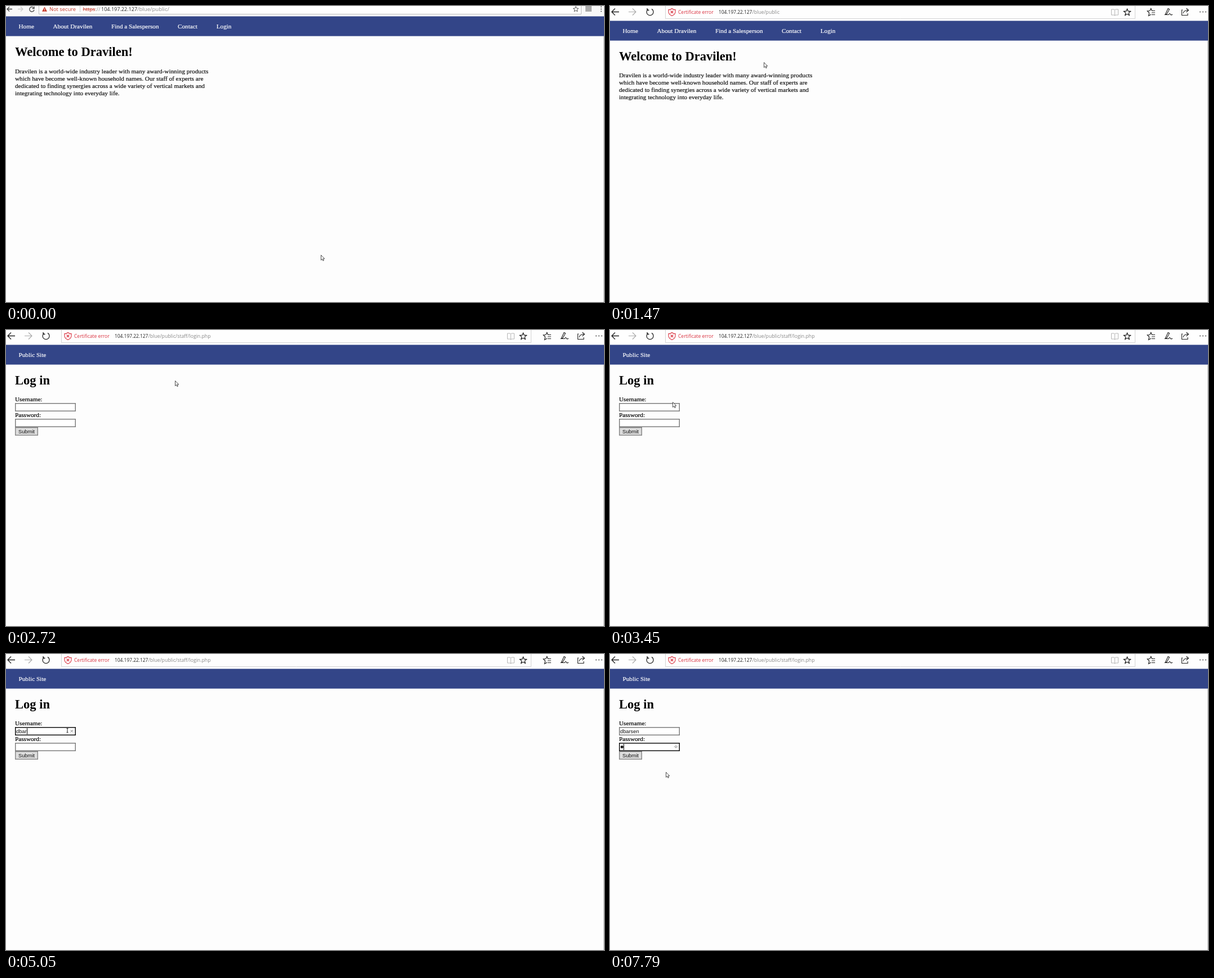
An HTML page with a canvas that plays this animation: 1062 px wide and 527 px high, repeating every 8000 ms.

```html
<!DOCTYPE html>
<html lang="en">
<meta charset="utf-8">
<title>Login demo</title>
<style>
  html, body { margin: 0; width: 100%; height: 100%; overflow: hidden; background: #fdfdfd; }
  canvas { display: block; }
</style>
<canvas id="stage" width="1062" height="527"></canvas>
<script>
const ctx = document.getElementById('stage').getContext('2d');
const LOOP = 8000, NAVY = '#334588', RED = '#d9303e';
const SERIF = '"Liberation Serif", serif';
const SANS = '"Liberation Sans", sans-serif';
const UI = '"Open Sans", sans-serif';

const PARAGRAPH = [
  'Dravilen is a world-wide industry leader with many award-winning products',
  'which have become well-known household names. Our staff of experts are',
  'dedicated to finding synergies across a wide variety of vertical markets and',
  'integrating technology into everyday life.'
];
const USER = 'dbarsen';
const USER_KEYS = [4170, 4740, 4900, 5050, 5320, 5460, 5600];

// Pointer positions: time, x, y, shape
const POINTER = [
  [0, 559, 443], [320, 530, 441], [510, 483, 437],
  [790, 440, 390], [950, 380, 310], [1110, 320, 220], [1270, 280, 150],
  [1430, 273, 100], [1590, 300, 65], [1740, 350, 48], [1890, 360, 47],
  [2030, 372, 46, 'hand'], [2160, 382, 45, 'hand'], [2590, 361, 59],
  [2720, 300, 90], [2855, 220, 130], [2990, 166, 158],
  [3300, 140, 140], [3450, 111, 128], [3600, 109, 132, 'beam'],
  [5990, 102, 147], [6140, 92, 161, 'beam'], [6290, 85, 172],
  [6560, 82, 162, 'beam'], [6850, 90, 185], [6990, 96, 200], [7130, 99, 210]
];

function rect(x, y, w, h, color) {
  ctx.fillStyle = color;
  ctx.fillRect(x, y, w, h);
}
function text(str, x, y, size, color = '#000', family = SERIF, weight = '') {
  ctx.font = `${weight} ${size}px ${family}`;
  ctx.fillStyle = ctx.strokeStyle = color;
  ctx.fillText(str, x, y);
  if (family === SERIF && !weight) {
    ctx.lineWidth = 0.2; // slightly heavier body text
    ctx.strokeText(str, x, y);
  }
  return x + ctx.measureText(str).width;
}
function line(path, color = '#222', width = 1.2, fill) {
  const shape = new Path2D(path);
  if (fill) { ctx.fillStyle = fill; ctx.fill(shape); }
  ctx.strokeStyle = color;
  ctx.lineWidth = width;
  ctx.stroke(shape);
}
function frame(x, y, w, h, color, width) {
  ctx.strokeStyle = color;
  ctx.lineWidth = width;
  ctx.strokeRect(x + width / 2, y + width / 2, w - width, h - width);
}
function star(cx, cy, r, color = '#111', width = 1.2) {
  let path = '';
  for (let i = 0; i < 10; i++) {
    const a = i * Math.PI / 5, d = i % 2 ? r * 0.45 : r;
    path += `${i ? 'L' : 'M'}${cx + d * Math.sin(a)} ${cy - d * Math.cos(a)}`;
  }
  line(path + 'Z', color, width);
}
function dots(x, y, dx, dy) {
  for (let i = -1; i < 2; i++) rect(x + i * dx - 0.8, y + i * dy - 0.8, 1.6, 1.6, '#333');
}

function compactToolbar() {
  rect(0, 0, 1062, 18, '#f8f8f8');
  rect(58, 0, 964, 15, '#fff');
  line('M58.5 0V14.5H1021.5V0', '#bbb', 1);
  line('M11 5.5H2M6 1.5L2 5.5L6 9.5', '#444', 1.3);
  line('M21 5.5H30M26 1.5L30 5.5L26 9.5', '#ccc', 1.3);
  line('M49 3A4.2 4.2 0 1 0 50 7M50 1V4.5H46.5', '#444', 1.3);
  line('M68.5 2L72.5 9.5H64.5Z', '#c53929', 0.6, '#c53929');
  rect(68, 4.5, 1, 2.4, '#fff');
  rect(68, 7.6, 1, 1, '#fff');
  text('Not secure', 77, 9, 9.3, '#c53929', UI);
  rect(131, 0, 1, 11, '#ccc');
  const end = text('https', 136.5, 9, 9.1, '#c53929', UI);
  rect(136.5, 5.6, end - 136.5, 0.8, '#c53929');
  text('://', end, 9, 9.1, '#888', UI);
  text('104.197.22.127', 169, 9, 9.05, '#222', UI);
  text('/blue/public/', 233, 9, 9.55, '#888', UI);
  star(1012, 5.8, 5, '#555', 1);
  rect(1029, 0, 11, 10, '#aaa');
  dots(1057, 5.5, 0, 4);
}

function wideToolbar(loading, path) {
  rect(0, 0, 1062, 26, '#fefefe');
  if (loading) {
    for (const [x, w] of [[78, 19], [934, 20], [970, 14], [1000, 29]]) rect(x, 3, w, 14, '#f1f1f1');
  }
  line('M98.5 0V22.5H932.5V0', '#d4d4d4', 1);
  line('M16 10.5H3M9 4.5L3 10.5L9 16.5', '#222', 1.3);
  line('M33 10.5H46M40 4.5L46 10.5L40 16.5', '#aaa', 1.2);
  if (loading) line('M66 5.5L76 15.5M76 5.5L66 15.5');
  else line('M67.5 5.8A6 6 0 1 0 74 5.4M66 4V7.5H69.5', '#222', 1.3);
  line('M110 4.5Q113 7 116 6.5V11Q115.5 15 110 17.5Q104.5 15 104 11V6.5Q107 7 110 4.5Z', RED, 1.1);
  line('M107.7 8.5L112.3 13M112.3 8.5L107.7 13', RED, 1.1);
  text('Certificate error', 121, 14, 8.5, RED, UI);
  text('104.197.22.127', 193, 14.3, 8.4, '#222', UI);
  text(path, 252.5, 14.3, 8.7, '#888', UI);
  line('M896.5 7V17M890.5 6H895L896.5 7L898 6H902.5V16H898L896.5 17L895 16H890.5Z', '#b5b5b5', 1);
  star(918.5, 11.5, 6.3);
  line('M961 15L956.5 17.3L957.6 12.3L954.3 9L958.7 8.5L960.7 4.5L962.5 8.5H968M962 12H968M962 15.5H968', '#222', 1.2);
  line('M986 15.5L991 4.5L993.5 5.8L989 14L986 15.5H992Q994 12 995 14.5T999 15', '#222', 1.1);
  line('M1017 7H1015.5V16.5H1026V13M1018 13Q1019 7.5 1027 7.5M1023.5 4L1027.5 7.5L1023.5 11', loading ? '#aaa' : '#222', 1.1);
  dots(1053, 10.5, 5, 0);
}

function page(top, links, title) {
  rect(0, top + 0.4, 1062, 35.2, NAVY);
  rect(1061, top + 36, 1, 491, '#c4c4c4');
  for (const [label, x] of links) text(label, x, top + 22.3, 11.2, '#fff');
  text(title, 16, top + 71, 22.5, '#000', SERIF, 'bold');
}

function homePage(top) {
  page(top, [['Home', 22.5], ['About Dravilen', 83.5], ['Find a Salesperson', 187],
    ['Contact', 305], ['Login', 373.7]], 'Welcome to Dravilen!');
  PARAGRAPH.forEach((row, i) => text(row, 16, top + (top < 20 ? 102 : 101.3) + i * 12.9, 11.2, '#111'));
}

function field(y, value, focused, hovered, caret) {
  rect(16, y, 108, 15, '#fff');
  frame(16, y, 108, 15, focused ? '#111' : hovered ? '#3ca5d4' : '#7d7d7d', 1.5);
  const end = text(value, 18, y + 10.8, 9.3, '#111', SANS);
  if (caret) rect(Math.round(end), y + 2, 1, 11, '#000');
}

function loginPage(t) {
  page(26, [['Public Site', 22.5]], 'Log in');
  text('Username:', 16, 127.3, 11.2);
  text('Password:', 16, 155.3, 11.2);
  const typed = USER.slice(0, USER_KEYS.filter(k => t >= k).length);
  const onUser = t >= 3760 && t < 6700, onPassword = t >= 6700;
  field(130, typed, onUser, t >= 3600 && t < 3760, onUser && t < 5990);
  if (onUser && typed) line('M114.5 135L119 139.5M119 135L114.5 139.5', '#777', 0.9);

  const dot = t >= 7550;
  field(158, '', onPassword, t >= 6140 && t < 6700, onPassword && !dot);
  if (dot) {
    line('M23.3 165.5A2 2 0 1 1 19.3 165.5A2 2 0 1 1 23.3 165.5', '#111', 1, '#111');
    rect(24, 160, 1, 11, '#000');
    line('M114 165.5Q117 161.5 120 165.5M116 165.3A1.1 1.1 0 1 0 118 165.3', '#777', 0.9);
  }
  rect(16, 173, 41, 15, '#ddd');
  frame(16, 173, 41, 15, '#858585', 1.4);
  text('Submit', 22, 183.8, 9.3, '#111', SANS);
}

function pointer(t) {
  const [, x, y, shape] = POINTER.findLast(p => t >= p[0]);
  ctx.save();
  ctx.translate(x, y);
  if (shape === 'beam') line('M-1.5 .5H1.5M0 .5V7.5M-1.5 7.5H1.5', '#222', 1);
  else if (shape === 'hand') line('M2 7V1Q3 0 4 1V5L7 6V10L6 12H2.5L0 8Z', '#222', 0.8, '#fff');
  else line('M.5 .5V9.5L2.6 7.6L4 10.7L5.4 10L4 7H6.8Z', '#222', 0.8, '#fff');
  ctx.restore();
}

function draw(t) {
  rect(0, 0, 1062, 527, '#fdfdfd');
  const login = t >= 2720;
  if (t < 120) {
    compactToolbar();
    homePage(18);
  } else {
    wideToolbar(t >= 2440 && !login, login ? '/blue/public/staff/login.php' : '/blue/public');
    login ? loginPage(t) : homePage(26);
  }
  pointer(t);
}

const start = performance.now();
function tick() {
  draw((performance.now() - start) % LOOP);
  requestAnimationFrame(tick);
}
tick();
</script>
</html>
```
